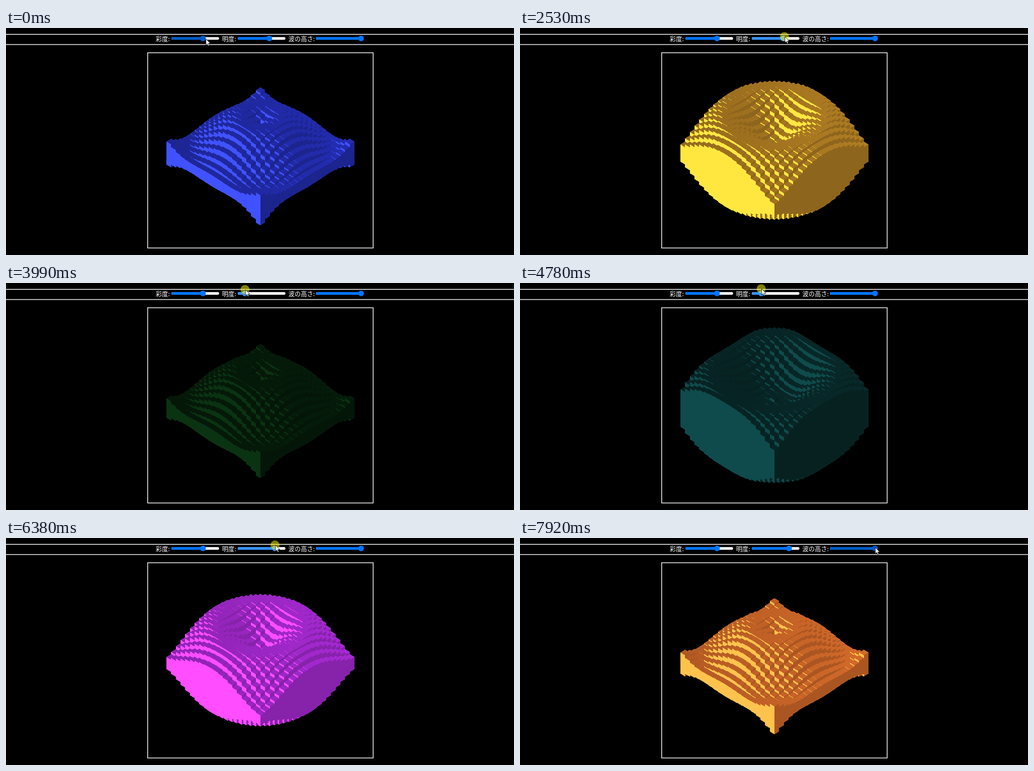
An HTML page with a canvas that plays this animation: 1118 px wide and 501 px high, repeating every 8 s.

```html
<!DOCTYPE html>
<html lang="ja">
<head>
<meta charset="utf-8">
<style>
  html, body { margin: 0; height: 100%; background: #000; overflow: hidden; }
  canvas { display: block; }
</style>
</head>
<body>
<canvas id="stage" width="1118" height="501"></canvas>
<script>
const ctx = document.getElementById('stage').getContext('2d');
const LOOP = 8000, STEP = 76.75, LAST = 103;
const GRID = 20, HALF_W = 10.35, HALF_H = 6.325, CENTER_X = 560, BACK_Y = 149.5;
const PRESS = 1480, RELEASE = 6600;
const ARROW = [[0, 0], [0, 13.5], [3.1, 10.8], [5.1, 15.6], [7.4, 14.6], [5.4, 10], [9.6, 10]];

// time, pointer x, pointer y, brightness thumb x
const KEYS = [
  [0, 440, 24, 579.5], [120, 440, 24, 579.5], [780, 583, 19, 579.5],
  [2620, 583, 19, 579.5], [3400, 546, 17, 545], [3990, 527, 14.5, 526],
  [4500, 525, 13, 524], [5460, 563, 11.5, 562], [6250, 593, 15.5, 592],
  [6850, 593, 16, 592], [7620, 782, 21, 592], [LOOP, 782, 21, 592]
];

const SLIDERS = [
  { label: '彩度:', textX: 329.5, x: 364 },
  { label: '明度:', textX: 475.5, x: 510 },
  { label: '波の高さ:', textX: 621.5, x: 682 }
];

function pointerAt(t) {
  const k = Math.max(1, KEYS.findIndex(key => key[0] >= t));
  const a = KEYS[k - 1], b = KEYS[k];
  const u = (t - a[0]) / (b[0] - a[0]);
  const e = u * u * (3 - 2 * u);
  const [, x, y, thumb] = a.map((v, i) => v + (b[i] - v) * e);
  return { x, y, thumb, pressed: t >= PRESS && t < RELEASE };
}

function hslToRgb(h, s, l) {
  return [0, 8, 4].map(n => {
    const k = (n + h / 30) % 12;
    return 255 * (l - s * Math.min(l, 1 - l) * Math.max(-1, Math.min(k - 3, 9 - k, 1)));
  });
}

const shade = (rgb, f) => `rgb(${rgb.map(c => Math.min(255, Math.round(c * f)))})`;
const gridX = k => Math.round(CENTER_X + k * HALF_W);

function strip(x, top, bottom, color) {
  const y = Math.round(top);
  ctx.fillStyle = color;
  ctx.fillRect(x, y, 1, Math.round(bottom) - y);
}

// Columns are filled in one-pixel strips, giving hard edges without seams.
function drawColumn(i, j, half, left, top, right) {
  const k = i - j, middle = gridX(k), end = gridX(k + 1);
  const cx = CENTER_X + k * HALF_W;
  const cy = BACK_Y + (i + j + 1) * HALF_H;
  for (let x = gridX(k - 1); x < end; x++) {
    const reach = Math.max(0, 1 - Math.abs(x + 0.5 - cx) / HALF_W) * HALF_H;
    strip(x, cy - half + reach, cy + half + reach, x < middle ? left : right);
    strip(x, cy - half - reach, cy - half + reach, top);
  }
}

function drawWave(t, brightness) {
  const base = hslToRgb((236 + 0.0641 * t) % 360, 0.67, 0.49 * brightness);
  const left = shade(base, 2.28), right = shade(base, 1);
  for (let i = 0; i < GRID; i++) {
    for (let j = 0; j < GRID; j++) {
      const phase = 0.4 * Math.hypot(i - 9, j - 9) - 7.49 - 0.00319 * t;
      const half = 41.25 + 30.75 * Math.cos(phase);
      drawColumn(i, j, half, left, shade(base, 1.14 + 0.1 * (i - j) / GRID), right);
    }
  }
}

function bar(x, width, color) {
  ctx.fillStyle = color;
  ctx.beginPath();
  ctx.roundRect(x, 20, width, 6, 3);
  ctx.fill();
}

function disc(x, y, r, color) {
  ctx.fillStyle = color;
  ctx.beginPath();
  ctx.arc(x, y, r, 0, 2 * Math.PI);
  ctx.fill();
}

function drawSlider({ label, textX, x }, thumb, hover, pressed) {
  const accent = pressed ? '#3793ff' : hover ? '#005cc8' : '#0075ff';
  ctx.fillStyle = '#fff';
  ctx.fillText(label, textX, 29);
  bar(x, 105, hover && !pressed ? '#e5e5e5' : '#f2f2f2');
  bar(x, thumb - x, accent);
  disc(thumb, 23, 6.2, accent);
}

function drawPage() {
  ctx.fillStyle = '#000';
  ctx.fillRect(0, 0, 1118, 501);
  ctx.fillStyle = '#fff';
  ctx.fillRect(0, 13.2, 1118, 1.6);
  ctx.fillRect(0, 35.7, 1118, 1.6);
  ctx.strokeStyle = '#fff';
  ctx.lineWidth = 1.6;
  ctx.strokeRect(311.8, 54.6, 496.2, 430.9);
}

function drawPointer({ x, y, pressed }) {
  if (pressed) disc(x - 1, y, 10, 'rgba(255,255,0,.5)');
  ctx.beginPath();
  ARROW.forEach(([px, py]) => ctx.lineTo(x + px, y + py));
  ctx.closePath();
  ctx.fillStyle = '#fff';
  ctx.strokeStyle = '#000';
  ctx.lineWidth = 0.9;
  ctx.fill();
  ctx.stroke();
}

function draw(t) {
  const pointer = pointerAt(t);
  const thumbs = [433.5, pointer.thumb, 781.5];
  drawPage();
  drawWave(t, (pointer.thumb - 516) / 93);
  ctx.font = '13.6px "Noto Sans CJK JP", "Noto Sans CJK", sans-serif';
  SLIDERS.forEach((slider, i) => {
    const over = pointer.x >= slider.x && pointer.x <= slider.x + 105 && pointer.y > 17;
    const pressed = pointer.pressed && i === 1;
    drawSlider(slider, thumbs[i], over, pressed);
  });
  drawPointer(pointer);
}

let shown = -1;
function tick() {
  const t = performance.now() % LOOP;
  const step = Math.min(LAST, Math.floor((t + 20) / STEP));
  if (step !== shown) draw(step * STEP);
  shown = step;
  requestAnimationFrame(tick);
}
tick();
</script>
</body>
</html>
```
